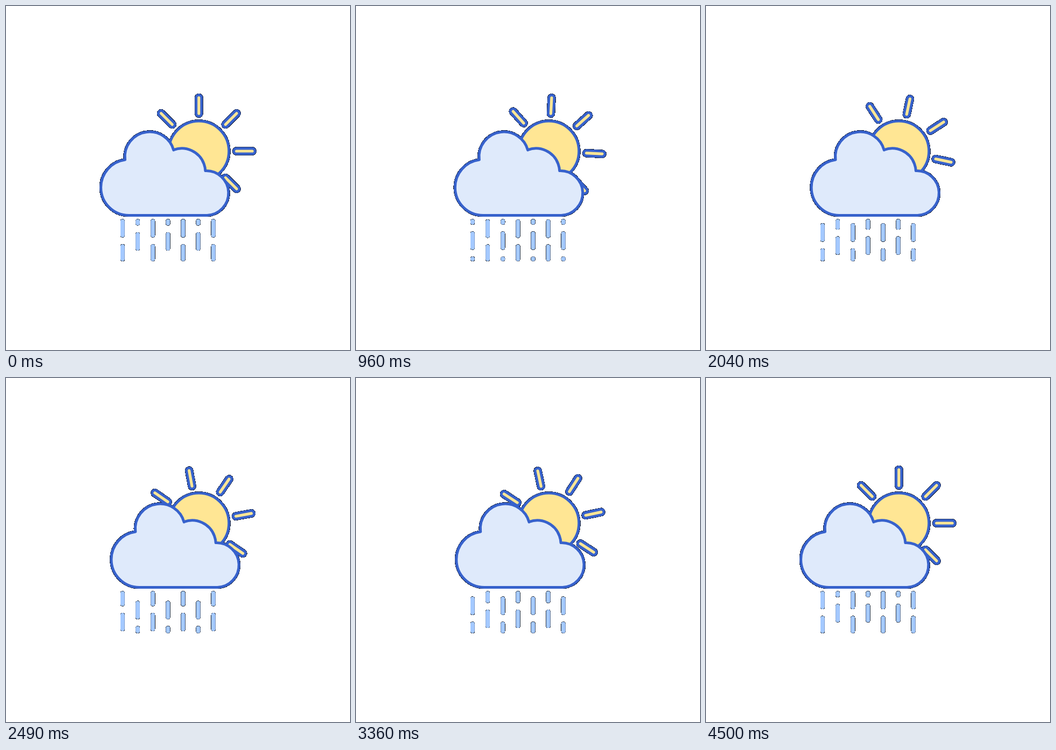
An HTML page with a canvas for the animation above (4530 ms loop, 640 px wide and 640 px high).

```html
<!DOCTYPE html>
<html lang="en">
<head>
<meta charset="utf-8">
<title>Sun, cloud and rain</title>
<style>
  html, body { margin: 0; width: 100%; height: 100%; overflow: hidden; background: #fff; }
  canvas { display: block; width: 640px; height: 640px; }
</style>
</head>
<body>
<canvas id="stage" width="640" height="640"></canvas>
<script>
const ctx = document.getElementById('stage').getContext('2d', { willReadFrequently: true });

const LOOP = 4530, STEP = 30, CYCLE = 4500;
const BLUE = '#3762cc', YELLOW = '#ffe694', CLOUD = '#dfeafb', RAIN = '#a4c9ff';
const SUN = { x: 358.8, y: 270, r: 56 };
const DRIFT = 20;
const DROPS = { x: 216.9, gap: 28.15, top: 400.4, bottom: 470.8, dash: 26.2, space: 20.5, travel: 326.4 };
const AREA = { x: 160, y: 150, w: 320, h: 340 };

// Lobes of the cloud, clockwise: centre, radius, and the points where each arc starts and ends.
const LOBES = [
  { x: 228.5, y: 337.5, r: 52, from: [228.5, 389.5], to: [221.6, 286] },
  { x: 267.3, y: 280.3, r: 46.2, from: [221.6, 286], to: [312, 268] },
  { x: 327, y: 309, r: 44, from: [312, 268], to: [371, 306.5] },
  { x: 372.5, y: 348, r: 41.5, from: [371, 306.5], to: [372.5, 389.5] }
];

const smooth = u => u * u * (3 - 2 * u);

function line(x1, y1, x2, y2, width, color) {
  ctx.beginPath();
  ctx.moveTo(x1, y1);
  ctx.lineTo(x2, y2);
  ctx.lineWidth = width;
  ctx.strokeStyle = color;
  ctx.stroke();
}

function fillAndOutline(color) {
  ctx.fillStyle = color;
  ctx.fill();
  ctx.lineWidth = 5;
  ctx.strokeStyle = BLUE;
  ctx.stroke();
}

function drawSun(progress) {
  ctx.save();
  ctx.translate(SUN.x, SUN.y);
  ctx.beginPath();
  ctx.arc(0, 0, SUN.r, 0, Math.PI * 2);
  fillAndOutline(YELLOW);
  ctx.rotate(progress * Math.PI * 1.25);
  for (let i = 0; i < 8; i++) {
    line(0, -70, 0, -99.4, 15, BLUE);
    line(0, -70, 0, -99.4, 5.2, YELLOW);
    ctx.rotate(Math.PI / 4);
  }
  ctx.restore();
}

function drawCloud(progress) {
  ctx.save();
  ctx.translate(DRIFT * smooth(1 - Math.abs(2 * progress - 1)), 0);
  ctx.beginPath();
  for (const { x, y, r, from, to } of LOBES) {
    const angle = p => Math.atan2(p[1] - y, p[0] - x);
    ctx.arc(x, y, r, angle(from), angle(to));
  }
  ctx.closePath();
  fillAndOutline(CLOUD);
  ctx.restore();
}

function drawRain(progress) {
  const { x, gap, top, bottom, dash, space, travel } = DROPS;
  const period = dash + space;
  ctx.save();
  ctx.setLineDash([dash, space]);
  for (let i = 0; i < 7; i++) {
    const shift = (travel * progress + (i % 2) * 24.4) % period;
    ctx.lineDashOffset = period - shift;
    line(x + gap * i, top, x + gap * i, bottom, 7.8, RAIN);
  }
  ctx.restore();
}

// Blend soft outer edges with black, leaving a thin dark rim on hard-edged shapes.
function darkenEdges() {
  const image = ctx.getImageData(AREA.x, AREA.y, AREA.w, AREA.h);
  const px = image.data;
  for (let i = 0; i < px.length; i += 4) {
    const alpha = px[i + 3];
    if (alpha === 255) continue;
    for (let c = 0; c < 3; c++) px[i + c] *= alpha / 255;
    px[i + 3] = alpha > 8 ? 255 : 0;
  }
  ctx.putImageData(image, AREA.x, AREA.y);
}

function render(now) {
  const time = Math.floor((now % LOOP) / STEP) * STEP;
  const progress = time / CYCLE;
  ctx.clearRect(0, 0, 640, 640);
  ctx.lineCap = ctx.lineJoin = 'round';
  drawSun(progress);
  drawCloud(progress);
  drawRain(progress);
  darkenEdges();
}

const start = performance.now();
function tick() {
  render(performance.now() - start);
  requestAnimationFrame(tick);
}
tick();
</script>
</body>
</html>
```
